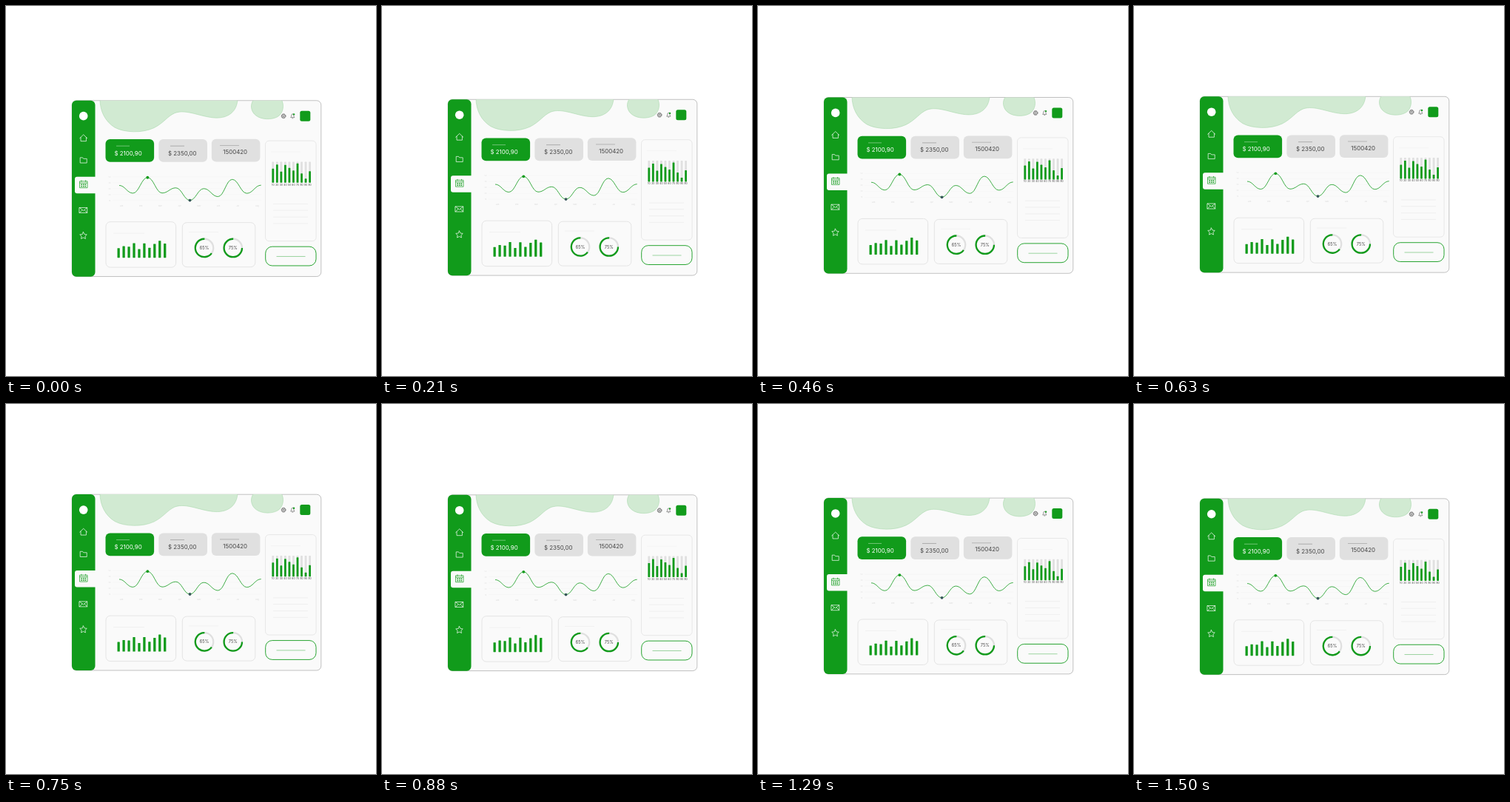
An HTML page for the animation above (1540 ms loop, 500 by 500 pixels).

```html
<!DOCTYPE html>
<html lang="en">
<head>
<meta charset="utf-8">
<title>Floating dashboard</title>
<style>
  html, body { margin: 0; width: 100%; height: 100%; overflow: hidden; background: #fff; }
  svg { display: block; width: 100%; height: 100%; }
  text { font-family: Inter, "Open Sans", sans-serif; }
</style>
</head>
<body>
<svg viewBox="0 0 500 500">
  <defs>
    <clipPath id="panelClip"><rect x="89" y="127.5" width="337" height="238" rx="6"/></clipPath>
  </defs>
  <g id="board">
    <rect x="89.2" y="127.6" width="336.6" height="237.8" rx="6" fill="#fafafa" stroke="#999" stroke-width=".6"/>
    <g clip-path="url(#panelClip)" fill="#d1ead2" stroke="#9fd3a2" stroke-width=".5">
      <path d="M127 126C127 142 134 156 147 164C160 171 184 172 200 164.5C213 158 218 149 228 144.5C244 138.500 264 150.500 284 151C300 151.300 312 143 313 126Z"/>
      <path d="M335 126C329 133 331 143 338 148C345 153.500 359 154 367 149.500C375 145 376.500 133 372 126Z"/>
    </g>
    <rect x="89" y="127.5" width="31.500" height="238" rx="6" fill="#119b1b"/>
    <path d="M121.500 230.500H96Q93 230.500 93 233.500V250Q93 253 96 253H121.500Z" fill="#fafafa"/>
    <circle cx="104.700" cy="148.500" r="5.800" fill="#fff"/>
    <g fill="none" stroke="#fff" stroke-width=".7" stroke-linejoin="round" stroke-linecap="round">
      <path d="M99.700 178.500L104.700 173.700L109.700 178.500M101 177.500V182.500H108.400V177.500"/>
      <path d="M100.200 211.500V204.700H103.500L104.700 206.200H109.200V211.500Z"/>
      <path d="M99.300 272.300H109.700V279.300H99.300ZL104.500 276.500L109.700 272.300M99.300 279.300L103 275.500M109.700 279.300L106 275.500"/>
      <path id="star"/>
    </g>
    <g id="calendar" fill="none" stroke="#119b1b" stroke-width=".7">
      <path d="M99.500 236.700H110V245.500H99.500ZM99.500 239H110M102 235.200V237.500M107.500 235.200V237.500"/>
    </g>
    <g fill="none" stroke="#555" stroke-width=".6">
      <circle cx="375.100" cy="148.600" r="2.900" stroke-width=".9" stroke-dasharray="1.500 .780"/>
      <circle cx="375.100" cy="148.600" r="2.300"/>
      <circle cx="375.100" cy="148.600" r="1"/>
      <path d="M384.700 150.500Q385.700 149.500 385.700 147.800Q385.800 145.700 387.300 145.700Q388.900 145.700 388.900 147.800Q388.900 149.500 389.900 150.500ZM386.500 151.600H388.100"/>
    </g>
    <circle cx="389" cy="146.200" r="1.200" fill="#119b1b"/>
    <rect x="397.300" y="141.500" width="14" height="14" rx="2.500" fill="#119b1b"/>
    <g id="content"></g>
  </g>
</svg>
<script>
const GREEN = '#119b1b', GREY = '#e0e0e0';
const board = document.getElementById('board');
const content = document.getElementById('content');

function add(tag, attrs, text, parent = content) {
  const el = document.createElementNS('http://www.w3.org/2000/svg', tag);
  for (const key in attrs) el.setAttribute(key, attrs[key]);
  if (text) el.textContent = text;
  parent.appendChild(el);
  return el;
}
const rect = (x, y, width, height, rx, fill) => add('rect', { x, y, width, height, rx, fill });
const frame = (x, y, width, height, rx, stroke, weight) =>
  add('rect', { x, y, width, height, rx, fill: '#fafafa', stroke, 'stroke-width': weight });
const rule = (x1, x2, y, stroke, weight = .5) =>
  add('line', { x1, x2, y1: y, y2: y, stroke, 'stroke-width': weight });
const label = (x, y, size, fill, text, anchor = 'middle') =>
  add('text', { x, y, fill, 'font-size': size, 'text-anchor': anchor }, text);

function drawIcons() {
  let d = '';
  for (let i = 0; i < 10; i++) {
    const a = i * Math.PI / 5 - Math.PI / 2, r = i % 2 ? 2.5 : 5;
    d += (i ? 'L' : 'M') + (104.5 + r * Math.cos(a)) + ' ' + (310.3 + r * Math.sin(a));
  }
  document.getElementById('star').setAttribute('d', d + 'Z');
  const calendar = document.getElementById('calendar');
  for (let i = 0; i < 6; i++) {
    add('rect', { x: 101.3 + i % 3 * 2.6, y: 240.3 + Math.floor(i / 3) * 2.4,
      width: 1.6, height: 1.5, fill: GREEN, stroke: 'none' }, '', calendar);
  }
}

function drawCards() {
  rect(134.5, 179.8, 65.6, 30.8, 6, GREEN);
  rect(206.4, 179.8, 65.6, 30.8, 6, GREY);
  rect(277.8, 179.6, 65.6, 30.8, 6, GREY);
  rule(149, 167, 189, '#cfeacf');
  rule(222, 241, 189, '#777');
  rule(289, 315, 188.3, '#888');
  label(146.5, 201.5, 7.9, '#fff', '$ 2100,90', 'start');
  label(219, 201.5, 7.9, '#444', '$ 2350,00', 'start');
  label(293.3, 200, 7.9, '#444', '1500420', 'start');
}

function drawWave() {
  for (let i = 0; i < 5; i++) {
    rule(144, 345, 230.5 + i * 8, '#f1f1f1');
    label(140, 231.5 + i * 8, 2.4, '#dcdcdc', String(50 - i * 10));
  }
  'Jan Feb Mar Apr May Jun Jul Aug'.split(' ').forEach((m, i) =>
    label(156 + i * 26.2, 270.5, 2.6, '#d8d8d8', m));
  const pts = [[153, 242.3], [171.5, 252.8], [191.3, 231.6], [211, 252.6], [229.5, 245.6],
    [248.5, 262.4], [267.3, 246.6], [286.5, 257.4], [305.7, 234.2], [325.5, 253], [344.7, 242]];
  let d = 'M' + pts[0];
  for (let i = 1; i < pts.length; i++) {
    const [x0, y0] = pts[i - 1], [x, y] = pts[i], k = (x - x0) * .42;
    d += `C${x0 + k} ${y0} ${x - k} ${y} ${x} ${y}`;
  }
  add('path', { d, fill: 'none', stroke: GREEN, 'stroke-width': .8 });
  add('circle', { cx: 191.3, cy: 231.6, r: 1.9, fill: GREEN });
  add('circle', { cx: 248.5, cy: 262.4, r: 1.9, fill: '#37565a' });
}

function drawBars() {
  frame(135, 291.5, 94.6, 61.5, 6, '#dcdcdc', .7);
  rule(145, 187, 307, '#e4e4e4');
  [13, 15.6, 15, 19.7, 11.7, 19.5, 13.3, 18.7, 23, 19.2].forEach((h, i) =>
    rect(150.5 + i * 6.95, 340 - h, 3.3, h, .4, GREEN));
}

function ring(cx, percent) {
  const cy = 326.8, r = 12.2, len = 2 * Math.PI * r;
  const base = { cx, cy, r, fill: 'none', 'stroke-width': 2.3 };
  add('circle', { ...base, stroke: GREY });
  add('circle', { ...base, stroke: GREEN,
    'stroke-dasharray': `${len * percent / 100} ${len}`,
    transform: `rotate(${270 - 3.6 * percent} ${cx} ${cy})` });
  label(cx, 328.9, 5.6, '#444', percent + '%');
}

function drawRings() {
  frame(238.3, 292.5, 98.5, 60, 6, '#dcdcdc', .7);
  rule(247, 287, 305.3, '#e6e6e6');
  ring(268, 65);
  ring(306.8, 75);
}

function drawSide() {
  frame(350.5, 182, 68.6, 135.5, 5, '#e0e0e0', .7);
  rule(358, 398, 197, '#ececec');
  const marks = [10, 20, 30, 40, 50, 60, 70, 80, 90, 80];
  [19, 24.5, 15, 24, 20, 16.5, 26, 12.5, 5.5, 15.5].forEach((h, i) => {
    const x = 360.8 + i * 5.53;
    rect(x - 1.4, 210.4, 2.8, 28.3, .6, GREY);
    rect(x - 1.4, 238.7 - h, 2.8, h, .6, GREEN);
    label(x, 242.4, 3.4, '#444', String(marks[i]));
  });
  [267.3, 276, 285, 293.7].forEach(y => rule(361, 408, y, '#e2e2e2'));
  frame(350.7, 325, 68.3, 25.8, 9, GREEN, .9);
  rule(365.5, 404.5, 338.3, '#5dba63', .6);
}

drawIcons();
drawCards();
drawWave();
drawBars();
drawRings();
drawSide();

const LOOP = 1540, STEP = 1000 / 24;

// The board bobs on a cosine, held at 24 steps a second.
function render(ms) {
  const t = Math.floor((ms % LOOP + 5) / STEP) * STEP;
  const y = -2.6 + 2.85 * Math.cos(2 * Math.PI * (t + 62) / LOOP);
  board.setAttribute('transform', `translate(0 ${y.toFixed(3)})`);
}

let start;
function tick(now) {
  if (start === undefined) start = now;
  render(now - start);
  requestAnimationFrame(tick);
}
render(0);
requestAnimationFrame(tick);
</script>
</body>
</html>
```
